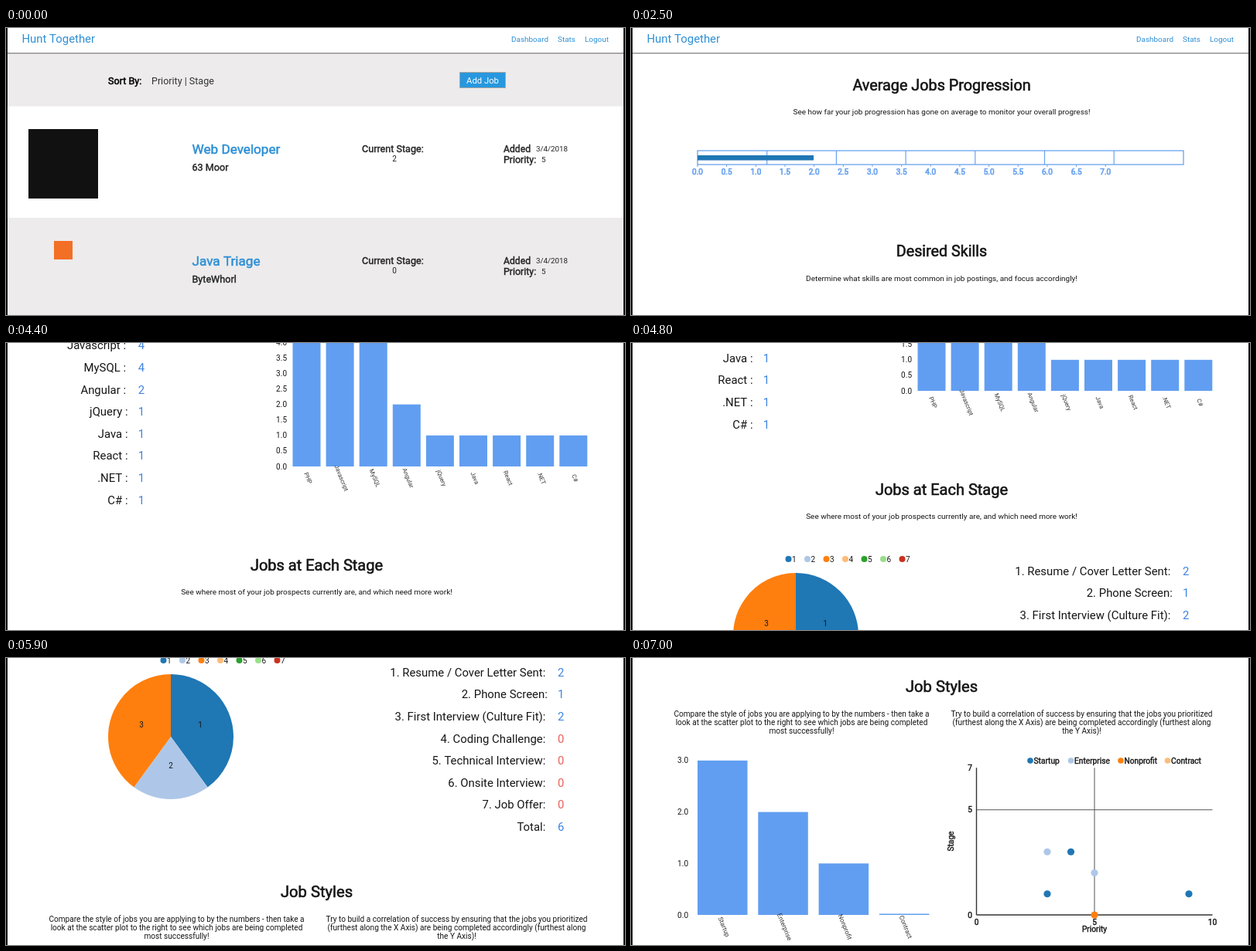
An HTML page with a canvas that plays this animation: 800 by 372 pixels, repeating every 7.1 s.

```html
<!DOCTYPE html>
<html lang="en">
<head>
<meta charset="utf-8">
<title>Job tracker</title>
<style>
html, body { margin: 0; width: 100%; height: 100%; overflow: hidden; background: #fff; }
canvas { display: block; }
</style>
</head>
<body>
<canvas id="stage" width="800" height="372"></canvas>
<script>
const g = document.getElementById('stage').getContext('2d');
const LOOP = 7100, STEP = 100, STATS_AT = 1900, TAU = Math.PI * 2;
const LINK = '#2d8fd5', BAR = '#619ef1', AXIS = '#6aa3ee', INK = '#161616', GREY = '#edebec';
const PALETTE = ['#1f77b4', '#aec7e8', '#ff7f0e', '#ffbb78', '#2ca02c', '#98df8a', '#c8321f'];
const SCROLL = [[2750, 0], [3500, 141], [4400, 421], [5300, 641], [5900, 796], [6600, 1062]];

function rect(x, y, w, h, color) {
  g.fillStyle = color;
  g.fillRect(x, y, w, h);
}

function dot(x, y, r, color) {
  g.fillStyle = color;
  g.beginPath();
  g.arc(x, y, r, 0, TAU);
  g.fill();
}

function line(x1, y1, x2, y2, color, width = 1) {
  g.strokeStyle = color;
  g.lineWidth = width;
  g.beginPath();
  g.moveTo(x1, y1);
  g.lineTo(x2, y2);
  g.stroke();
}

// y is the middle of the capital letters
function text(s, x, y, size, { color = INK, align = 'left', bold = 0, turn = 0 } = {}) {
  g.save();
  g.translate(x, y);
  g.rotate(turn * Math.PI / 180);
  g.font = `${size}px Roboto, Inter, sans-serif`;
  g.textAlign = align;
  g.fillStyle = g.strokeStyle = color;
  g.fillText(s, 0, size * 0.355);
  if (bold) {
    g.lineWidth = bold;
    g.strokeText(s, 0, size * 0.355);
  }
  g.restore();
}

const center = (s, y, size, bold) => text(s, 401.5, y, size, { align: 'center', bold });

function header() {
  text('Hunt Together', 20.5, 14, 14.9, { color: LINK });
  [['Dashboard', 653], ['Stats', 713], ['Logout', 748]]
    .forEach(([s, x]) => text(s, x, 14.5, 9.95, { color: LINK }));
  rect(0, 32, 800, 1.3, '#858585');
}

function job(y, title, company, stage) {
  const dark = '#222';
  text(title, 240.5, y, 17.15, { color: LINK, bold: 0.5 });
  text(company, 240.5, y + 24, 12.6, { color: dark, bold: 0.4 });
  text('Current Stage:', 460, y - 0.5, 12.6, { color: dark, bold: 0.4 });
  text(stage, 502, y + 12, 10, { color: dark, align: 'center' });
  text('Added', 643, y - 0.5, 12.2, { color: dark, bold: 0.4 });
  text('3/4/2018', 685, y, 9.8, { color: dark });
  text('Priority:', 643, y + 13.5, 12.4, { color: dark, bold: 0.4 });
  text('5', 692, y + 14, 9.8, { color: dark });
}

function dashboard() {
  rect(0, 33, 800, 68.5, GREY);
  rect(0, 246, 800, 126, GREY);
  header();
  text('Sort By:', 132, 69, 12.6, { color: '#000', bold: 0.5 });
  text('Priority | Stage', 188, 69, 12.5, { color: '#333' });
  rect(586, 57, 60, 21, '#a9a49d');
  rect(587, 58, 58, 19, '#2798df');
  text('Add Job', 616, 67.5, 11.3, { color: '#fff', align: 'center' });
  rect(29, 131, 90, 90, '#111');
  rect(62, 276, 24, 24, '#f36f25');
  job(157, 'Web Developer', '63 Moor', 2);
  job(302, 'Java Triage', 'ByteWhorl', 0);
}

function progress(t) {
  center('Average Jobs Progression', 74, 19.8, 0.6);
  center('See how far your job progression has gone on average to monitor your overall progress!', 108.5, 9.95);
  const p = Math.min(1, Math.max(0, (t - 2204) / 450));
  const ease = p < 0.5 ? 4 * p ** 3 : 1 - 4 * (1 - p) ** 3;
  if (!ease) return;
  g.strokeStyle = AXIS;
  g.lineWidth = 1.3;
  g.strokeRect(86, 159, 628, 18);
  for (let i = 1; i < 7; i++) line(86 + i * 89.7, 159, 86 + i * 89.7, 177, AXIS, 1.2);
  rect(86, 165, 150, 6.5, PALETTE[0]);
  for (let v = 0; v <= 7; v += 0.5) {
    const x = 86 + v * 89.7 * ease;
    line(x, 177, x, 180, AXIS);
    text(v.toFixed(1), x, 186.5, 10, { color: AXIS, align: 'center', bold: 0.7 });
  }
}

function listRow(label, value, right, y) {
  const color = value ? '#3f83e0' : '#e8625c';
  text(label, right - (value === 1 ? 21.5 : 24), y, 14.9, { align: 'right' });
  text(value, right, y, 14.9, { color, align: 'right' });
}

function bars(data, x, base, width, gap, unit, size, labelY) {
  data.forEach(([name, value], i) => {
    const left = x + i * gap;
    const h = Math.max(1.5, value * unit);
    rect(left, base - h, width, h, BAR);
    text(name, left + width / 2 + 2, base + labelY, size, { align: 'center', turn: 68, color: '#333' });
  });
}

function skills() {
  center('Desired Skills', 289, 19.7, 0.6);
  center('Determine what skills are most common in job postings, and focus accordingly!', 324, 9.98);
  const data = [['PHP', 5], ['Javascript', 4], ['MySQL', 4], ['Angular', 2], ['jQuery', 1],
    ['Java', 1], ['React', 1], ['.NET', 1], ['C#', 1]];
  data.forEach(([name, n], i) => listRow(name + ' :', n, 179, 395.5 + i * 28.6));
  for (let v = 0; v <= 5; v += 0.5)
    text(v.toFixed(1), 363, 581 - v * 40.2, 10, { align: 'right' });
  bars(data, 370.5, 581, 36, 43.1, 40.2, 7.8, 15);
}

function stages() {
  center('Jobs at Each Stage', 709, 20, 0.6);
  center('See where most of your job prospects currently are, and which need more work!', 743.5, 9.98);
  PALETTE.forEach((color, i) => {
    const x = 203.5 + i * 24.5;
    dot(x, 799, 4, color);
    text(i + 1, x + 4.5, 799, 10);
  });
  let from = -TAU / 4;
  [2, 1, 2].forEach((n, i) => {
    const to = from + n / 5 * TAU, mid = (from + to) / 2;
    g.fillStyle = PALETTE[i];
    g.beginPath();
    g.moveTo(213, 898);
    g.arc(213, 898, 81, from, to);
    g.fill();
    text(i + 1, 213 + 40 * Math.cos(mid), 895 + 40 * Math.sin(mid), 10, { align: 'center' });
    from = to;
  });
  [['1. Resume / Cover Letter Sent:', 2], ['2. Phone Screen:', 1], ['3. First Interview (Culture Fit):', 2],
    ['4. Coding Challenge:', 0], ['5. Technical Interview:', 0], ['6. Onsite Interview:', 0],
    ['7. Job Offer:', 0], ['Total:', 6]
  ].forEach(([label, n], i) => listRow(label, n, 721.3, 814.5 + i * 28.6));
}

function paragraph(lines, x) {
  lines.forEach((s, i) => text(s, x, 1134 + i * 11.4, 10.08, { align: 'center' }));
}

function styles() {
  center('Job Styles', 1099, 20.2, 0.6);
  paragraph(['Compare the style of jobs you are applying to by the numbers - then take a',
    'look at the scatter plot to the right to see which jobs are being completed',
    'most successfully!'], 220.5);
  paragraph(['Try to build a correlation of success by ensuring that the jobs you prioritized',
    '(furthest along the X Axis) are being completed accordingly (furthest along',
    'the Y Axis)!'], 582.5);

  const base = 1395;
  for (let v = 0; v <= 3; v++)
    text(v.toFixed(1), 74, base - v * 66.7, 10, { align: 'right' });
  bars([['Startup', 3], ['Enterprise', 2], ['Nonprofit', 1], ['Contract', 0]],
    86, base, 64.5, 78.3, 66.7, 8.3, 15.5);

  const bold = 0.4;
  [['Startup', 516], ['Enterprise', 568.5], ['Nonprofit', 633], ['Contract', 693.5]].forEach(([s, x], i) => {
    dot(x, 1195, 3.8, PALETTE[i]);
    text(s, x + 4.5, 1195, 10.2, { bold });
  });
  const px = v => 446.5 + v * 30.5, py = v => base - v * 27.25;
  line(px(5), py(7), px(5), base, '#555');
  line(px(0), py(5), px(10), py(5), '#555');
  line(px(0), py(7), px(0), base, '#333', 1.4);
  line(px(0), base, px(10), base, '#333', 1.4);
  [0, 5, 7].forEach(v => text(v, 441, py(v), 10.2, { align: 'right', bold }));
  [0, 5, 10].forEach(v => text(v, px(v), base + 9.5, 10.2, { align: 'center', bold }));
  text('Priority', px(5), base + 18.5, 10.2, { align: 'center', bold });
  text('Stage', 413.5, base - 95.5, 10.2, { align: 'center', bold, turn: -90 });
  [[3, 1, 0], [4, 3, 0], [9, 1, 0], [3, 3, 1], [5, 2, 1], [5, 0, 2]]
    .forEach(([x, y, c]) => dot(px(x), py(y), 4.6, PALETTE[c]));
}

function scrollAt(t) {
  for (let i = 1; i < SCROLL.length; i++) {
    const [t0, y0] = SCROLL[i - 1], [t1, y1] = SCROLL[i];
    if (t < t1) return y0 + (y1 - y0) * Math.max(0, (t - t0) / (t1 - t0));
  }
  return SCROLL[SCROLL.length - 1][1];
}

function draw() {
  const t = Math.floor(performance.now() % LOOP / STEP) * STEP;
  rect(0, 0, 800, 372, '#fff');
  if (t < STATS_AT) {
    dashboard();
  } else {
    g.save();
    g.translate(0, -Math.round(scrollAt(t)));
    header();
    progress(t);
    skills();
    stages();
    styles();
    g.restore();
  }
  rect(0, 0, 2, 372, '#111');
  rect(798, 0, 2, 372, '#111');
  requestAnimationFrame(draw);
}
draw();
</script>
</body>
</html>
```
